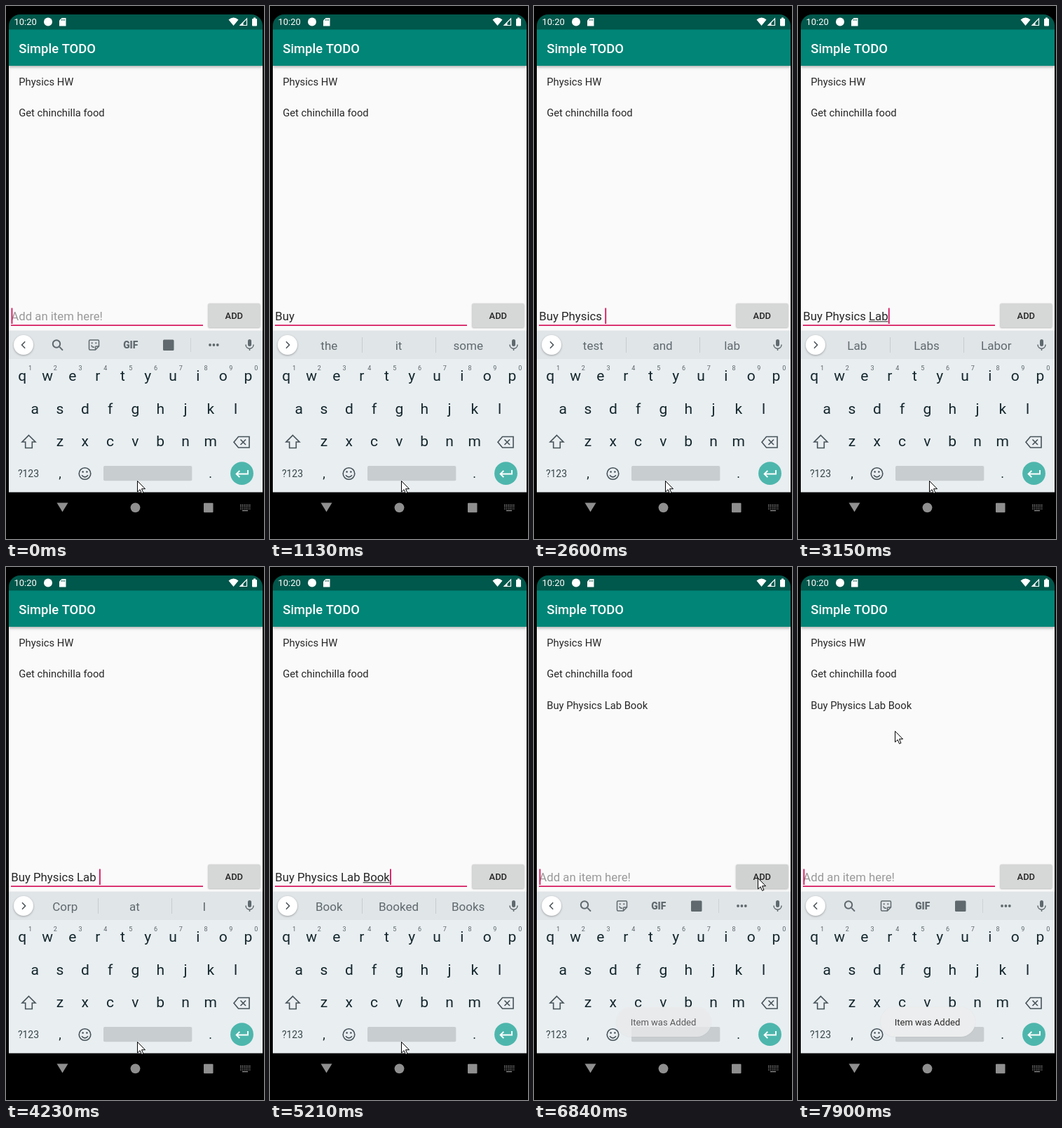
Write an HTML page with a canvas that moves like this. It is 368 px wide and 758 px high and loops after 8000 ms.

```html
<!DOCTYPE html>
<html lang="en">
<head>
<meta charset="utf-8">
<title>Simple TODO</title>
<style>
html, body { margin: 0; width: 100%; height: 100%; overflow: hidden; background: #000; }
canvas { display: block; width: 368px; height: 758px; }
</style>
</head>
<body>
<canvas id="stage"></canvas>
<script>
const W = 368, H = 758, LOOP = 8000;
const canvas = document.getElementById('stage');
const ctx = canvas.getContext('2d');
const dpr = window.devicePixelRatio || 1;
canvas.width = W * dpr;
canvas.height = H * dpr;

const ACCENT = '#d81b60', INK = '#262626', ICON = '#5f696e', KEY = '#14272d';

// time, text in the field, suggestions ('' shows the toolbar)
const typing = [
  [0, '', ''],
  [150, 'B', 'But|By|Be'],
  [290, 'Bu', 'But|Bus|Buy'],
  [420, 'Buy', 'Buy|Buying|Buyers'],
  [550, 'Buy ', 'the|it|some'],
  [1380, 'Buy P', 'Pick|Put|Please'],
  [1550, 'Buy Ph', 'Phone|Photo|Phones'],
  [1720, 'Buy Phy', 'Physics|Phys|Physical'],
  [1880, 'Buy Phys', 'Physics|Physical|Physician'],
  [2050, 'Buy Physi', 'Physics|Physical|Physician'],
  [2200, 'Buy Physic', 'Physics|Physical|Physician'],
  [2400, 'Buy Physics', 'Physics|Physical|Physician'],
  [2600, 'Buy Physics ', 'test|and|lab'],
  [2880, 'Buy Physics L', 'Lab|Let|Love'],
  [3010, 'Buy Physics La', 'Lab|Last|Late'],
  [3140, 'Buy Physics Lab', 'Lab|Labs|Labor'],
  [3270, 'Buy Physics Lab ', 'Corp|at|I'],
  [4630, 'Buy Physics Lab B', 'But|Be|By'],
  [4910, 'Buy Physics Lab Bo', 'Book|Box|Bottom'],
  [5060, 'Buy Physics Lab Boo', 'Book|Boo|Books'],
  [5210, 'Buy Physics Lab Book', 'Book|Booked|Books'],
  [6570, '', 'Book|Booked|Books'],
  [6690, '', '']
];
const caretOff = [[1130, 1380], [3830, 4230], [5750, 6150], [7110, 7620]];
// [time, value] steps
const press = [[0, 0], [6290, .4], [6420, 1], [6570, .8], [6690, .5], [6830, .2], [6970, 0]];
const itemFade = [[0, 0], [6570, .5], [6690, 1]];
const toastFade = [[0, 0], [6690, .3], [6830, .75], [6970, 1]];
const toButton = [[0, 0], [5610, .08], [5750, .35], [5890, .68], [6020, .9], [6150, 1]];
const toList = [[0, 0], [7480, .15], [7620, .5], [7760, .86], [7900, 1]];

const at = (rows, t) => rows.filter(r => r[0] <= t).pop();
const level = (rows, t) => at(rows, t)[1];
const mix = (a, b, p) => a + (b - a) * p;

function text(s, x, y, size, color, align = 'left', weight = 400) {
  ctx.font = `${weight} ${size}px Roboto, sans-serif`;
  ctx.textAlign = align;
  ctx.fillStyle = color;
  ctx.fillText(s, x, y);
}
function rect(x, y, w, h, color, r = 0) {
  ctx.fillStyle = color;
  ctx.beginPath();
  ctx.roundRect(x, y, w, h, r);
  ctx.fill();
}
function disc(x, y, r, color) {
  ctx.fillStyle = color;
  ctx.beginPath();
  ctx.arc(x, y, r, 0, 7);
  ctx.fill();
}
function fill(d, color) {
  ctx.fillStyle = color;
  ctx.fill(new Path2D(d));
}
function stroke(d, color, w = 1.6) {
  ctx.strokeStyle = color;
  ctx.lineWidth = w;
  ctx.stroke(new Path2D(d));
}
function shadow(blur, dy, alpha, draw) {
  ctx.save();
  ctx.shadowColor = `rgba(0,0,0,${alpha})`;
  ctx.shadowBlur = blur * dpr;
  ctx.shadowOffsetY = dy * dpr;
  draw();
  ctx.restore();
}

function statusBar() {
  rect(4, 12, 362, 21.5, '#00574b', [16, 16, 0, 0]);
  text('10:20', 11.5, 27, 13, '#fff');
  disc(60, 22.5, 6, '#fff');
  fill('M79.5 17H85.5V28.5H76V20.5Z', '#fff');
  stroke('M79.5 18.5V21M81.5 18.5V21M83.5 18.5V21', '#00574b', .8);
  fill('M317.5 19.5Q324.5 13.5 331.5 19.5L324.5 28Z', '#fff');
  stroke('M343.5 18V27.5H334Z', '#fff', 1.2);
  fill('M338.5 23V28H333.5Z', '#fff');
  rect(351, 18, 7, 10.5, '#fff', 1);
  rect(353, 16.5, 3, 2, '#fff');
}

function app(t) {
  rect(4, 85, 362, 377, '#fafafa');
  shadow(4, 1.5, .3, () => rect(4, 33, 362, 52, '#008577'));
  statusBar();
  text('Simple TODO', 18.3, 67, 18.4, '#fff', 'left', 500);
  text('Physics HW', 18.2, 113, 14.75, INK);
  text('Get chinchilla food', 18.2, 157.3, 14.75, INK);
  ctx.globalAlpha = level(itemFade, t);
  text('Buy Physics Lab Book', 18.2, 201.6, 14.75, INK);
  ctx.globalAlpha = 1;
}

function field(t, value) {
  const x = 7.3, size = 16.75;
  if (value) text(value, x, 447, size, INK);
  else text('Add an item here!', x, 447, size, '#999');
  const end = x + (value ? ctx.measureText(value).width : 0);
  if (value && !value.endsWith(' ')) {
    const start = x + ctx.measureText(value.slice(0, value.lastIndexOf(' ') + 1)).width;
    rect(start, 448.3, end - start, 1, INK);
  }
  rect(7, 453.3, 274, 1.8, ACCENT);
  if (!caretOff.some(([a, b]) => t >= a && t < b)) rect(end + .2, 429.5, 1.9, 22.5, ACCENT);

  const p = level(press, t), g = mix(214, 186, p);
  shadow(mix(2, 5, p), mix(.6, 1.8, p), .3, () =>
    rect(288.3, 423, 74, 34.5, `rgb(${g},${g + 1},${g + 1})`, 2));
  text('ADD', 325.3, 444.8, 12.9, INK, 'center', 500);
}

function toolbar() {
  stroke('M76.4 484.9L81 489.6', ICON, 2);
  ctx.beginPath();
  ctx.arc(72, 480.5, 5.2, 0, 7);
  ctx.stroke();
  stroke('M120 475H131Q132.5 475 132.5 476.5V484L127.5 489H120Q118.5 489 118.5 487.5V476.5Q118.5 475 120 475ZM132.5 484H128.5Q127.5 484 127.5 485V489M121.8 482.5Q123 486 126 485', ICON, 1.5);
  disc(122.7, 479.3, 1.1, ICON);
  disc(128.3, 479.3, 1.1, ICON);
  text('GIF', 177.7, 486.5, 13.8, ICON, 'center', 900);
  rect(224, 474.5, 15.5, 15.5, ICON, 1.5);
  rect(263, 472, 1, 20, '#cdd2d5');
  for (let i = 0; i < 3; i++) disc(291 + i * 5.4, 482, 1.9, ICON);
}

function strip(words) {
  rect(4, 461.5, 362, 41, '#e0e5e8');
  shadow(3, 1, .3, () => disc(25, 482, 14, '#fff'));
  stroke(words ? 'M23 477.3L27.6 482L23 486.7' : 'M27.2 477.3L22.6 482L27.2 486.7', '#4d565a', 1.6);
  if (words) {
    words.split('|').forEach((w, i) => text(w, 84.3 + i * 99.2, 488.5, 17, ICON, 'center'));
    rect(131, 471, 1, 22, '#c6cccf');
    rect(236, 471, 1, 22, '#c6cccf');
  } else toolbar();
  rect(345, 474, 5, 10, ICON, 2.5);
  stroke('M342 481.5C342 489 353 489 353 481.5M347.5 487V490', ICON, 1.5);
}

function keyboard() {
  rect(4, 502, 362, 189.5, '#e9eef1');
  const step = 35.8;
  [['qwertyuiop', 23.3, 533], ['asdfghjkl', 41.2, 579.5], ['zxcvbnm', 77, 626]].forEach(([row, x, y]) =>
    [...row].forEach((c, i) => text(c, x + i * step, y, 21, KEY, 'center')));
  [...'1234567890'].forEach((c, i) => text(c, 34.5 + i * step, 518, 9, '#5a656a', 'center'));

  stroke('M32.5 610.5L42 620H37.3V628.5H27.7V620H23Z', '#465359', 1.6);
  stroke('M331.5 612.5H347V628H331.5L325 620.2ZM334.5 616.5L342 624M342 616.5L334.5 624', '#465359', 1.6);
  text('?123', 32, 670, 14, '#37464b', 'center');
  text(',', 77, 670.5, 18, KEY, 'center');
  text('.', 291.5, 671, 18, KEY, 'center');

  ctx.strokeStyle = '#465359';
  ctx.lineWidth = 1.6;
  ctx.beginPath();
  ctx.arc(112.5, 665, 8.3, 0, 7);
  ctx.stroke();
  stroke('M108 667.2Q112.5 672.5 117 667.2', '#465359', 1.6);
  disc(109.6, 662.5, 1.3, '#465359');
  disc(115.4, 662.5, 1.3, '#465359');

  rect(139, 654, 126.3, 21.3, '#c8cdd0', 2);
  disc(336.5, 664.7, 16.4, '#4db6ac');
  stroke('M345 660V665.5H329M333.3 660.8L328.6 665.5L333.3 670.2', '#fff', 1.9);
}

function navBar() {
  const c = '#8f8f8f';
  fill('M72.5 706.5H88.5L80.5 719.5Z', c);
  disc(184.5, 713.3, 6.9, c);
  rect(282, 706.8, 13.5, 13.5, c, 1);
  for (let y = 0; y < 3; y++)
    for (let x = 0; x < 6; x++) rect(334 + x * 2.6, 709 + y * 2.7, 1.4, 1.4, c);
  rect(337, 717, 8, 1.3, c);
}

function toast(t) {
  ctx.globalAlpha = level(toastFade, t);
  if (ctx.globalAlpha) {
    shadow(2, .5, .06, () => rect(117.5, 625.5, 135.5, 42.5, '#ecedee', 21));
    text('Item was Added', 184.5, 651.8, 13, '#2b2b2b', 'center');
  }
  ctx.globalAlpha = 1;
}

function pointer(t) {
  const a = level(toButton, t), b = level(toList, t);
  const x = mix(mix(187.5, 319.5, a), 138.5, b);
  const y = mix(mix(675.5, 442.5, a), 233.5, b);
  ctx.save();
  ctx.translate(x, y);
  const d = 'M0 0V15.5L3.6 12.2L6.1 17.8L8.4 16.8L6 11.2H11Z';
  fill(d, '#fff');
  stroke(d, '#000', 1);
  ctx.restore();
}

function draw(t) {
  ctx.setTransform(dpr, 0, 0, dpr, 0, 0);
  rect(0, 0, W, H, '#000');
  const [, value, words] = at(typing, t);
  app(t);
  field(t, value);
  strip(words);
  keyboard();
  navBar();
  toast(t);
  pointer(t);
}

const start = performance.now();
function tick() {
  draw((performance.now() - start) % LOOP);
  requestAnimationFrame(tick);
}
tick();
</script>
</body>
</html>
```
